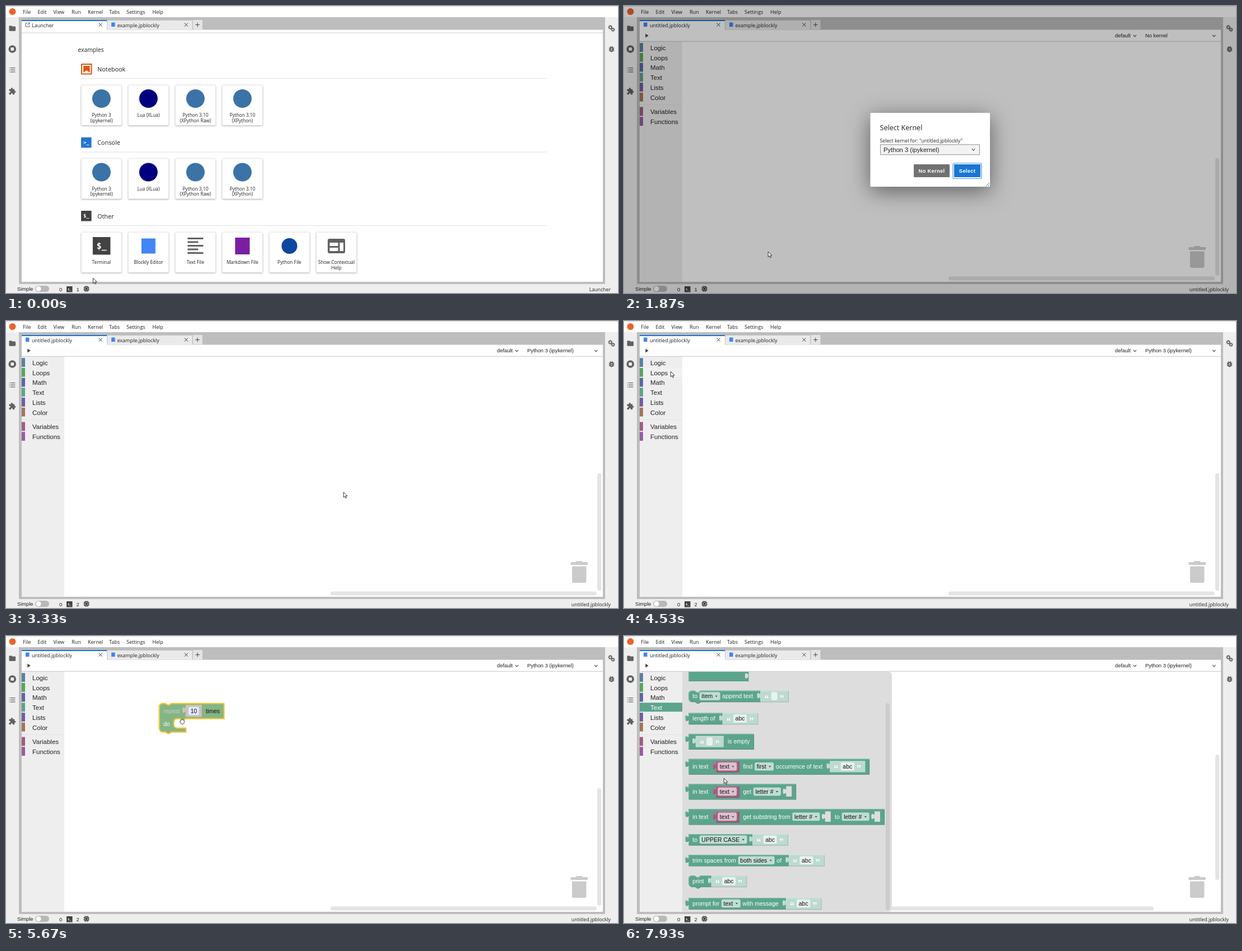
Animation of 1092x513 px, one loop 8 s. Source, as an HTML page with a canvas:

```html
<!DOCTYPE html>
<html lang="en">
<head>
<meta charset="utf-8">
<title>Block editor walkthrough</title>
<style>
  html, body { margin: 0; width: 100%; height: 100%; overflow: hidden; background: #fff; }
  canvas { display: block; }
</style>
</head>
<body>
<canvas id="stage" width="1092" height="513"></canvas>
<script>
const c = document.getElementById('stage').getContext('2d');
const UI = '"Open Sans", "Noto Sans", sans-serif';
const SANS = '"Liberation Sans", Arial, sans-serif';
const MONO = '"DejaVu Sans Mono", monospace';
const GREY = '#616161', LOOPS = '#5ba55b', TEXT = '#5ba58c', VARS = '#a55b80';

// ---------- drawing helpers ----------
function rect(x, y, w, h, color, r = 0) {
  c.fillStyle = color;
  c.beginPath();
  c.roundRect(x, y, w, h, r);
  c.fill();
}
function frame(x, y, w, h, color, width = 1, r = 0) {
  c.strokeStyle = color;
  c.lineWidth = width;
  c.beginPath();
  c.roundRect(x, y, w, h, r);
  c.stroke();
}
function disc(x, y, r, color) {
  rect(x - r, y - r, 2 * r, 2 * r, color, r);
}
function stroke(d, color, width = 1) {
  c.strokeStyle = color;
  c.lineWidth = width;
  c.stroke(new Path2D(d));
}
function icon(d, x, y, scale, color = GREY) {
  c.save();
  c.translate(x, y);
  c.scale(scale, scale);
  c.translate(-12, -12);
  c.fillStyle = color;
  c.fill(new Path2D(d));
  c.restore();
}
function text(s, x, y, size = 9, font = UI, color = '#212121', align = 'left', weight = '') {
  c.font = `${weight} ${size}px ${font}`;
  c.fillStyle = color;
  c.textAlign = align;
  c.fillText(s, x, y);
}
function shadowed(blur, dy, color, draw) {
  c.save();
  c.shadowBlur = blur;
  c.shadowOffsetY = dy;
  c.shadowColor = color;
  draw();
  c.restore();
}
const chevron = (x, y) => stroke(`M${x - 2.7} ${y - 1.4}l2.7 2.7 2.7-2.7`, '#444', 1.1);
const cross = (x, y) => stroke(`M${x - 3} ${y - 3}l6 6m0-6l-6 6`, '#333', 1);

// ---------- blocks ----------
const labelWidth = s => {
  c.font = `10.53px ${SANS}`;
  return c.measureText(s).width;
};
const blockText = (s, x, mid, color = '#fff') => text(s, x, mid + 3.7, 10.53, SANS, color);
const TAB = 'c0-7.2-5.7 5.7-5.7-5.4s5.7 1.8 5.7-5.4';
const BUMP = 'l-4.3 2.9h-2.2l-4.3-2.9';

const valuePath = (x, y, w, h) => `M${x} ${y}h${w}v${h}h${-w}V${y + 14.4}${TAB}z`;
const topEdge = (x, y, w) =>
  `M${x} ${y + 5.7}a5.7 5.7 0 0 1 5.7-5.7H${x + 10.8}l4.3 2.9h2.2l4.3-2.9H${x + w}`;
const bottomEdge = (x, y) => `V${y}H${x + 21.6}${BUMP}H${x + 5.7}a5.7 5.7 0 0 1-5.7-5.7z`;
const stackPath = (x, y, w, h) => topEdge(x, y, w) + bottomEdge(x, y + h);
const loopPath = (x, y, w) => topEdge(x, y, w) +
  `V${y + 27}H${x + 47}${BUMP}H${x + 31.5}a5.7 5.7 0 0 0-5.7 5.7V${y + 38.3}` +
  `a5.7 5.7 0 0 0 5.7 5.7H${x + 47.5}` + bottomEdge(x, y + 51);

function body(d, color) {
  const path = new Path2D(d);
  c.save();
  c.translate(.7, .7);
  for (const fill of [color, 'rgba(0,0,0,.25)']) {
    c.fillStyle = fill;
    c.fill(path);
  }
  c.translate(-.7, -.7);
  c.fillStyle = color;
  c.fill(path);
  c.clip(path);
  c.translate(.7, .7);
  c.strokeStyle = 'rgba(255,255,255,.3)';
  c.lineWidth = .9;
  c.stroke(path);
  c.restore();
}

function dropdown(label, x, mid) {
  const w = labelWidth(label) + 17;
  rect(x, mid - 7.3, w, 14.6, 'rgba(255,255,255,.62)', 2.8);
  blockText(label, x + 3.6, mid, '#111');
  c.fillStyle = '#555';
  c.fill(new Path2D(`M${x + w - 9} ${mid - 1}h4.4l-2.2 2.8z`));
}

const quoteWidth = label => 38.8 + Math.max(11, labelWidth(label) + 7.2);
function quoteBlock(label, x, mid, color = '#bddad0') {
  const w = quoteWidth(label);
  body(valuePath(x, mid - 10, w, 19.9), color);
  text('“', x + 7, mid + 10, 17, SANS, '#fff', 'left', 'bold');
  text('”', x + w - 7, mid + 10, 17, SANS, '#fff', 'right', 'bold');
  rect(x + 19.4, mid - 7.3, w - 38.8, 14.6, 'rgba(255,255,255,.65)', 2.8);
  blockText(label, x + 23, mid, '#111');
}

// Prefixes: [dropdown  {variable  "quoted text  #number  _empty input  *gear; otherwise a label.
const parts = {
  '[': { width: s => labelWidth(s) + 17, draw: dropdown },
  '*': { width: () => 12, draw(s, x, mid) {
    rect(x, mid - 6, 12, 12, '#2d5fc4', 2.5);
    frame(x + 3.5, mid - 2.5, 5, 5, '#fff', 1.5, 2.5);
  } },
  '{': { input: 12.9, width: s => labelWidth(s) + 25, draw(s, x, mid) {
    body(valuePath(x, mid - 10, labelWidth(s) + 25, 19.9), VARS);
    dropdown(s, x + 4, mid);
  } },
  '"': { input: 12.9, width: quoteWidth, draw: quoteBlock },
  '#': { input: 10.3, width: s => labelWidth(s) + 16.6, draw(s, x, mid, selected) {
    const w = labelWidth(s) + 16.6, d = valuePath(x, mid - 10.5, w, 21);
    body(d, '#bdc2db');
    if (selected) stroke(d, 'rgba(225,190,60,.8)', 1.2);
    rect(x + 4.7, mid - 7.3, w - 9.4, 14.6, 'rgba(255,255,255,.65)', 2.8);
    blockText(s, x + 8.3, mid, '#111');
  } },
  '_': { input: 12.9, width: () => 10, draw(s, x, mid) {
    c.fillStyle = '#ddd';
    c.fill(new Path2D(valuePath(x, mid - 9.5, 10, 18.5)));
  } },
  label: { width: labelWidth, draw: blockText }
};

// Walks along the parts of one row, optionally drawing, and returns the row's two possible widths.
function layout(items, x, mid, draw, selected) {
  const start = x;
  let prev = 'start';
  for (const item of items) {
    const part = parts[item[0]] || parts.label;
    const s = part === parts.label ? item : item.slice(1);
    if (part.input) x += prev === 'field' ? 9.3 : part.input;
    else x += prev === 'start' || prev === 'input' ? 7.3 : 3.7;
    if (draw) part.draw(s, x, mid, selected && part === parts['#']);
    x += part.width(s);
    prev = part.input ? 'input' : item[0] === '[' ? 'field' : 'label';
  }
  return { plain: x + 7.2 - start, open: x + (prev === 'field' ? 9.6 : 12.9) - start };
}

function blockHeight([shape, items]) {
  if (shape === 'loop') return 51;
  if (shape === 'join') return 35.8;
  return items.some(s => '{"#_'.includes(s[0])) && shape !== 'quote' ? 27.6 : 19.9;
}

function block(spec, x, y, color, selected) {
  const [shape, items, arg] = spec;
  const h = blockHeight(spec);
  const mid = y + (shape === 'loop' ? 13.5 : shape === 'join' ? 10 : h / 2);
  if (shape === 'quote') return quoteBlock('', x, mid, color);
  const size = layout(items, x, mid);
  const w = arg === undefined ? size.plain : size.open;
  const makePath = { loop: loopPath, stack: stackPath }[shape] || valuePath;
  const d = makePath(x, y, w, h);
  body(d, color);
  if (selected) stroke(d, '#f5c52c', 2);
  layout(items, x, mid, true, selected);
  if (shape === 'loop') blockText('do', x + 7.2, y + 37);
  if (shape === 'join') {
    c.fillStyle = '#ddd';
    for (const dy of [14.4, 32]) c.fill(new Path2D(`M${x + w} ${y + dy}${TAB}z`));
  } else if (arg !== undefined) quoteBlock(arg, x + w, mid);
}

const repeatBlock = ['loop', ['repeat', '#10', 'times']];
const loopBlocks = [
  repeatBlock,
  ['loop', ['repeat', '[while', '_']],
  ['loop', ['count with', '[i', 'from', '#1', 'to', '#10', 'by', '#1']],
  ['loop', ['for each item', '[j', 'in list', '_']],
  ['stack', ['[break out', 'of loop']]
];
const textBlocks = [
  ['quote', []],
  ['join', ['*', 'create text with'], ''],
  ['stack', ['to', '[item', 'append text'], ''],
  ['value', ['length of'], 'abc'],
  ['value', ['"', 'is empty']],
  ['value', ['in text', '{text', 'find', '[first', 'occurrence of text', '"abc']],
  ['value', ['in text', '{text', 'get', '[letter #', '_']],
  ['value', ['in text', '{text', 'get substring from', '[letter #', '_', 'to', '[letter #', '_']],
  ['value', ['to', '[UPPER CASE'], 'abc'],
  ['value', ['trim spaces from', '[both sides', 'of'], 'abc'],
  ['stack', ['print'], 'abc'],
  ['value', ['prompt for', '[text', 'with message'], 'abc']
];

function flyout(specs, right, color, scroll) {
  c.save();
  c.beginPath();
  c.roundRect(104, 64, right - 104, 428.5, [0, 5.7, 5.7, 0]);
  c.clip();
  rect(104, 64, right - 104, 429, '#ddd');
  let y = 73.5 - scroll;
  for (const spec of specs) {
    block(spec, 115, y, color);
    y += blockHeight(spec) + 17.2 + (spec[0] === 'stack' || spec[0] === 'loop' ? 2.9 : 0);
  }
  if (y > 500 - scroll) rect(467, 66 + scroll * 54 / 66, 7, 370, '#cbcbcb', 3.5);
  c.restore();
}

// ---------- application ----------
const FOLDER = 'M10 4H4c-1.1 0-2 .9-2 2v12c0 1.1.9 2 2 2h16c1.1 0 2-.9 2-2V8c0-1.1-.9-2-2-2h-8z';
const LIST = 'M7 5h14v2H7zM7 11h14v2H7zM7 17h14v2H7zM3 5h2v2H3zM3 11h2v2H3zM3 17h2v2H3z';
const PUZZLE = 'M20.5 11H19V7c0-1.1-.9-2-2-2h-4V3.5a2.5 2.5 0 0 0-5 0V5H4c-1.1 0-2 .9-2 2v3.8h1.5' +
  'a2.7 2.7 0 0 1 0 5.4H2V20c0 1.1.9 2 2 2h3.8v-1.5a2.7 2.7 0 0 1 5.4 0V22H17c1.1 0 2-.9 2-2v-4h1.5a2.5 2.5 0 0 0 0-5z';
const BUG = 'M20 8h-2.8l-1.8-2L17 4.4 15.6 3l-2.2 2.2h-2.8L8.4 3 7 4.4 8.6 6 6.8 8H4v2h2v2H4v2h2v2H4v2h2.8' +
  'a6 6 0 0 0 10.4 0H20v-2h-2v-2h2v-2h-2v-2h2zM14 16h-4v-2h4zm0-4h-4v-2h4z';

function gear(x, y, r) {
  frame(x - r, y - r, 2 * r, 2 * r, GREY, 1.5, r);
  c.setLineDash([r * .42, r * .42]);
  frame(x - r - 1, y - r - 1, 2 * r + 2, 2 * r + 2, GREY, 1.3, r + 1);
  c.setLineDash([]);
}
function prompt(x, y, size, label = '$_', color = '#424242') {
  rect(x, y, size, size, color);
  text(label, x + size / 2, y + size * .66, size * .48, MONO, '#fff', 'center', 'bold');
}

function chrome(editing, kernelCount) {
  rect(0, 0, 1092, 513, '#eee');
  rect(0, 0, 1092, 20, '#fff');
  rect(0, 0, 1092, 1, '#dcdcdc');
  rect(23, 20, 1046, 477, '#bdbdbd');
  disc(11.5, 10, 6, '#e8642a');
  const menu = { File: 30, Edit: 56.5, View: 84.5, Run: 117, Kernel: 146, Tabs: 184, Settings: 215, Help: 261 };
  for (const name in menu) text(name, menu[name], 14.3);

  icon(FOLDER, 11.3, 40, .58);
  disc(11.3, 77, 6.8, GREY);
  rect(8.5, 74.2, 5.6, 5.6, '#eee');
  icon(LIST, 11, 114.3, .6);
  icon(PUZZLE, 11.3, 152.5, .58);
  gear(1078.3, 38, 2.3);
  gear(1083, 42.3, 2);
  icon(BUG, 1080.5, 77, .6);

  rect(28, 25, 152, 18, '#fff');
  rect(28, 25, 152, 2, '#1f74cf');
  rect(180.5, 25.5, 152, 17, '#eaeaea');
  frame(180.5, 25.5, 152, 17, '#c4c4c4');
  rect(333.5, 25, 17, 17, '#e4e4e4');
  if (editing) rect(35, 29.5, 6.5, 7.5, '#4285f4');
  else stroke('M38 30.5h-3v6.5h6.5v-3M39 30h3v3M42 30l-4 4', GREY, 1);
  rect(188, 29.5, 6.5, 7.5, '#4285f4');
  const title = editing ? 'untitled.jpblockly' : 'Launcher';
  text(title, 46, 37.8);
  text('example.jpblockly', 198.5, 37.8);
  cross(168.5, 33.5);
  cross(321.5, 33.5);
  stroke('M338 33.5h7.5M341.75 29.7v7.6', '#444', 1);
  rect(28, 42.5, 1037, 450.5, '#fff');

  text('Simple', 20, 508.5, 9.33, SANS);
  rect(52, 500, 25, 11, '#b8b8b8', 5.5);
  disc(58, 505.5, 4.5, '#fff');
  text('0', 95, 509.5, 9.33, SANS);
  prompt(108, 501, 10.5);
  text(kernelCount, 125.5, 509.5, 9.33, SANS);
  frame(140, 502, 7, 7, '#333', 1.3, 1);
  rect(142, 504, 3, 3, '#333');
  stroke('M142 499.8v11.4M145 499.8v11.4M138 504h11.4M138 507h11.4', 'rgba(50,50,50,.7)', .8);
  text(title, 1079, 509.7, 8.8, UI, '#212121', 'right');
}

const kernels = ['Python 3\n(ipykernel)', 'Lua (XLua)', 'Python 3.10\n(XPython Raw)', 'Python 3.10\n(XPython)'];
const tools = ['Terminal', 'Blockly Editor', 'Text File', 'Markdown File', 'Python File', 'Show Contextual\nHelp'];
const kernelIcon = (x, y, i) => disc(x, y, 16.5, i === 1 ? '#00007f' : '#3b73a6');
const toolIcons = [
  (x, y) => prompt(x - 15.5, y - 16, 31.5),
  (x, y) => rect(x - 12.5, y - 13.5, 25, 27, '#4285f4'),
  (x, y) => [28, 19, 28, 19, 28].forEach((w, i) => rect(x - 14, y - 15 + i * 6.5, w, 3, GREY)),
  (x, y) => rect(x - 13, y - 15, 26, 30, '#7b1fa2'),
  (x, y) => disc(x, y, 14, '#0d47a1'),
  (x, y) => {
    rect(x - 15.5, y - 13, 31, 26, GREY, 3);
    for (const [dx, dy, w, h] of [[-12, -6, 15, 6], [-12, 3, 15, 6], [6, -6, 6.5, 15]]) rect(x + dx, y + dy, w, h, '#fff');
  }
];

function launcher() {
  rect(28, 47.3, 1037, 1.2, '#d4d4d4');
  text('examples', 128.5, 82.3, 10.3);
  ['Notebook', 'Console', 'Other'].forEach((name, i) => {
    const y = 103 + 131.5 * i;
    text(name, 163, y + 13.5, 10.9);
    rect(134, y + 26, 830, 1, '#e0e0e0');
    (i < 2 ? kernels : tools).forEach((label, k) => {
      const x = 134.3 + 83.85 * k;
      shadowed(3, 1, 'rgba(0,0,0,.38)', () => rect(x, y + 38.3, 72, 72, '#fff', 1.5));
      frame(x, y + 38.3, 72, 72, '#e2e2e2', .7, 1.5);
      (i < 2 ? kernelIcon : toolIcons[k])(x + 36, y + (i < 2 ? 62.5 : 63), k);
      label.split('\n').forEach((s, n) => text(s, x + 36, y + 95 + 9.8 * n, 8.3, UI, '#212121', 'center'));
    });
  });
  frame(135, 104, 17.5, 17.5, '#e0560f', 2);
  c.fillStyle = '#e0560f';
  c.fill(new Path2D('M138 107h11.5v12l-5.75-4-5.75 4z'));
  prompt(134, 234.8, 18.5, '>_', '#2475cf');
  prompt(134, 366, 18.5);
}

const categories = [['Logic', '#5b80a5'], ['Loops', LOOPS], ['Math', '#5b67a5'], ['Text', TEXT],
  ['Lists', '#745ba5'], ['Color', '#a5745b'], ['Variables', VARS], ['Functions', '#995ba5']];

function toolbox(active, hovered) {
  rect(28, 63, 76, 429.5, '#eee');
  rect(28, 176.3, 76, .8, '#e0e0e0');
  categories.forEach(([name, color], i) => {
    const mid = 75 + 17.72 * i + (i > 5 ? 8 : 0);
    if (name === hovered) rect(28, mid - 9, 76, 17, '#f1f1f1');
    rect(28, mid - 8.8, name === active ? 76 : 6, 15.8, color);
    text(name, 47, mid + 4, 11.49, SANS, name === active ? '#fff' : '#222');
  });
}

function toolbar(kernel) {
  rect(28, 62.7, 1037, 1.1, '#c4c4c4');
  c.fillStyle = '#424242';
  c.fill(new Path2D('M38.3 49.5v7l5.4-3.5z'));
  text('default', 876, 56, 9.33, SANS);
  chevron(911.5, 53.3);
  text(kernel, 930, 56, 9.33, SANS);
  chevron(1052.8, 53.3);
  rect(1017, 429, 11.5, 4, '#cbcbcb', 1.5);
  rect(1007.5, 431, 30.5, 5, '#cbcbcb', 1);
  rect(1010, 438.5, 25.5, 29.5, '#cbcbcb', [0, 0, 3, 3]);
}

function dialog(selectColor) {
  rect(0, 0, 1092, 513, 'rgba(0,0,0,.25)');
  shadowed(38, 8, 'rgba(0,0,0,.5)', () => rect(439.5, 191, 213.5, 132, '#fff', 1.5));
  text('Select Kernel', 456.5, 221.7, 12.6);
  text('Select kernel for: "untitled.jpblockly"', 456.5, 243.8, 8.78);
  rect(457, 247.5, 178, 18.5, '#f3f3f3');
  frame(457.5, 247.8, 177, 18, '#8f8f8f');
  text('Python 3 (ipykernel)', 463, 260.8, 11.2, SANS);
  chevron(623.5, 256.8);
  frame(587, 281, 51, 27.5, '#4c8fdc', 1.2, 2.5);
  rect(517, 283, 64, 23, '#717171', 1);
  rect(589, 283, 47, 23, selectColor, 1);
  c.letterSpacing = '0.3px';
  text('No Kernel', 549, 298, 9.33, SANS, '#fff', 'center', 'bold');
  text('Select', 612.5, 298, 9.33, SANS, '#fff', 'center', 'bold');
  c.letterSpacing = '0px';
  stroke('M646 322l6-6M649.5 322l2.5-2.5', '#555', .9);
}

// ---------- timeline ----------
const clamp = u => Math.min(1, Math.max(0, u));
const linear = u => u;
const smooth = u => u * u * (3 - 2 * u);
const out = u => u * (2 - u);
const pointerKeys = [
  [0, 155, 486], [800, 251, 441, smooth], [1800, 251, 441], [2670, 604, 309, smooth], [2860, 602, 305.5, out],
  [3400, 602, 305.5], [4270, 92, 86, smooth], [4530, 83, 90, out], [4740, 83, 90], [5230, 156, 106, smooth],
  [5600, 304, 145], [5667, 314, 153], [5990, 351, 184, out], [6060, 351, 184], [6470, 95, 151, smooth],
  [6730, 79, 128, out], [7000, 79, 128], [7867, 178, 251, smooth], [7930, 178, 254], [8000, 178, 254]
];
function pointerAt(t) {
  const i = Math.max(1, pointerKeys.findIndex(k => k[0] >= t));
  const [t0, x0, y0] = pointerKeys[i - 1];
  const [t1, x1, y1, ease = linear] = pointerKeys[i];
  const u = ease((t - t0) / (t1 - t0));
  return [x0 + (x1 - x0) * u, y0 + (y1 - y0) * u];
}

function pointer(x, y, hand) {
  const d = hand
    ? 'M-3.6-.5q0-2 1.4-1.6 0-2 1.5-1.5 1.3-1.2 2 .1 1.6-.4 1.6 1.2 1.5 0 1.2 1.8L3.4 2Q2.5 4.5.4 4.5-1.8 4.5-2.6 2.5z'
    : 'M0 0v9.4l2.2-2 1.5 3.4 1.6-.7-1.5-3.2h3z';
  const path = new Path2D(d);
  c.save();
  c.translate(x + .3, y + .3);
  c.fillStyle = '#fff';
  c.fill(path);
  c.strokeStyle = '#222';
  c.lineWidth = .9;
  c.stroke(path);
  c.restore();
}

function draw(t) {
  const between = (a, b) => t >= a && t < b;
  const [px, py] = pointerAt(t);
  const dropped = t >= 5990;
  const active = between(4790, 5260) ? 'Loops' : t >= 7060 ? 'Text' : '';
  const hovered = between(4250, 4790) ? 'Loops' : between(6520, 7060) ? 'Text' : '';

  chrome(t >= 1390, t < 3320 ? '1' : '2');
  if (t < 1390) launcher();
  if (t >= 1460) {
    toolbox(active, hovered);
    rect(dropped ? 440 : 579, 483.5, dropped ? 505 : 475, 7, '#e4e4e4', 3.5);
    rect(1055, dropped ? 212 : 272, 7.3, dropped ? 224 : 210, '#e4e4e4', 3.5);
  }
  if (t >= 1660) toolbar(t < 3260 ? 'No kernel' : 'Python 3 (ipykernel)');
  if (t >= 5260) {
    if (dropped) block(repeatBlock, 310.7, 151.7, LOOPS, true);
    else block(repeatBlock, px - 40.5, py - 32.5, '#84b584', true);
  }
  if (active === 'Loops') flyout(loopBlocks, 372, LOOPS, 0);
  if (active === 'Text') flyout(textBlocks, 478, TEXT, 66 * smooth(clamp((t - 7500) / 300)));
  if (between(1660, 3260)) dialog(t < 2860 ? '#1976d2' : t < 3120 ? '#1565c0' : '#0d47a1');
  pointer(px, py, between(5190, 6060));
}

const start = performance.now();
function tick() {
  const t = (performance.now() - start) % 8000;
  draw(Math.min(7999, Math.floor(t * .015 + .1) / .015));
  requestAnimationFrame(tick);
}
tick();
</script>
</body>
</html>
```
